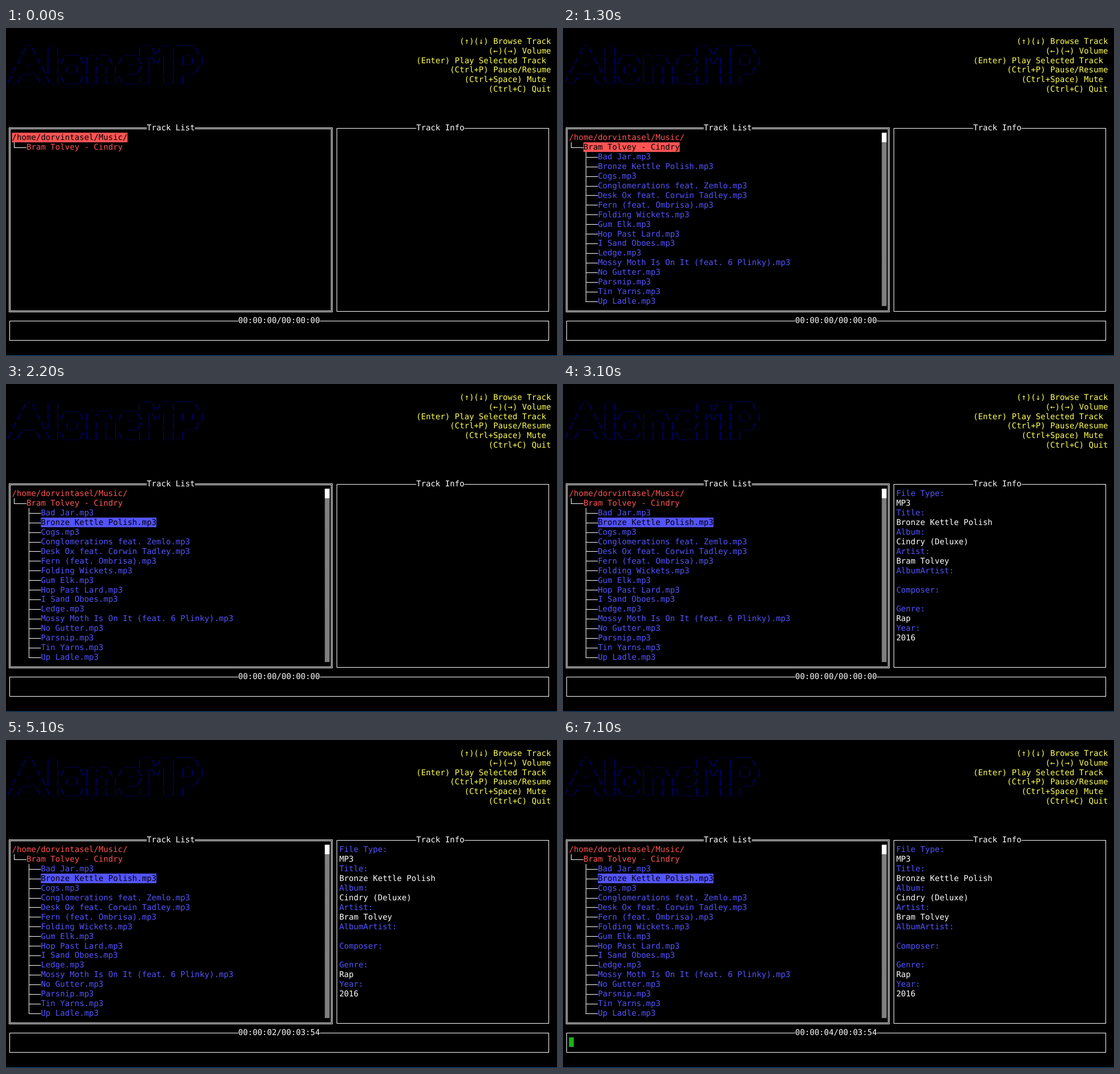
Animation of 970 by 577 pixels, one loop 8000 ms. Source, as an HTML page with a canvas:

```html
<!DOCTYPE html>
<html lang="en">
<head>
<meta charset="utf-8">
<title>Terminal music player</title>
<style>
html, body { margin: 0; width: 100%; height: 100%; overflow: hidden; background: #000; }
canvas { display: block; }
</style>
</head>
<body>
<canvas id="stage" width="970" height="577"></canvas>
<script>
const ctx = document.getElementById('stage').getContext('2d');
const LOOP = 8000;

// Terminal grid: 9 x 18 px cells, shown slightly reduced
const SCALE = 0.9413;
const CELL_W = 9 * SCALE, CELL_H = 18 * SCALE, LEFT = 2.1, TOP = -2.2, BASELINE = 12.9;
const WHITE = '#fff', RED = '#ff5454', BLUE = '#5454ff', YELLOW = '#ffff54',
      GREEN = '#18b218', NAVY = '#00009c';

const BANNER = [
  '    _    _                  __  __ ____',
  '   / \\  | | ___  _ __   ___|  \\/  |  _ \\',
  "  / _ \\ | |/ _ \\| '_ \\ / _ \\ |\\/| | |_) |",
  ' / ___ \\| | (_) | | | |  __/ |  | |  __/',
  '/_/   \\_\\_|\\___/|_| |_|\\___|_|  |_|_|'
];
const HELP = [
  '(↑)(↓) Browse Track',
  '(←)(→) Volume',
  '(Enter) Play Selected Track ',
  '(Ctrl+P) Pause/Resume',
  '(Ctrl+Space) Mute ',
  '(Ctrl+C) Quit'
];
const ROOT = '/home/dorvintasel/Music/';
const FOLDER = 'Bram Tolvey - Cindry';
const TRACKS = [
  'Bad Jar', 'Bronze Kettle Polish', 'Cogs', 'Conglomerations feat. Zemlo',
  'Desk Ox feat. Corwin Tadley', 'Fern (feat. Ombrisa)', 'Folding Wickets',
  'Gum Elk', 'Hop Past Lard', 'I Sand Oboes', 'Ledge',
  'Mossy Moth Is On It (feat. 6 Plinky)', 'No Gutter', 'Parsnip',
  'Tin Yarns', 'Up Ladle'
];
const INFO = [
  ['File Type:', 'MP3'], ['Title:', 'Bronze Kettle Polish'],
  ['Album:', 'Cindry (Deluxe)'], ['Artist:', 'Bram Tolvey'],
  ['AlbumArtist:', ''], ['Composer:', ''], ['Genre:', 'Rap'], ['Year:', '2016']
];

// Moments at which the selection moves down and the clock ticks
const MOVES = [700, 1900, 2200];
const TICKS = [4000, 5100, 6100, 7100];
const OPEN = 1300, PLAY = 3100, BAR = 6100;

const colX = c => LEFT + c * CELL_W;
const rowY = r => TOP + r * CELL_H;
// Rules fall on whole pixels; a row's rule sits just below its middle
const midX = c => Math.floor(colX(c + 0.5));
const midY = r => Math.floor(rowY(r + 0.54));
const passed = (times, t) => times.filter(at => t >= at).length;

function rect(x, y, w, h, color = WHITE) {
  ctx.fillStyle = color;
  ctx.fillRect(x, y, w, h);
}

function cells(col, row, cols, rows, color) {
  rect(colX(col), rowY(row), cols * CELL_W, rows * CELL_H, color);
}

function text(str, col, row, color = WHITE) {
  ctx.fillStyle = color;
  const y = rowY(row) + BASELINE;
  [...str].forEach((ch, i) => {
    if (ch !== ' ') ctx.fillText(ch, colX(col + i), y);
  });
}

function item(str, col, row, color, selected) {
  if (selected) cells(col, row, str.length, 1, color);
  text(str, col, row, selected ? '#000' : color);
}

function frame(x1, y1, x2, y2) {
  ctx.strokeStyle = WHITE;
  ctx.lineWidth = 1;
  ctx.strokeRect(x1 + 0.5, y1 + 0.5, x2 - x1, y2 - y1);
}

function panel(c1, r1, c2, r2, title, titleCol, double) {
  const box = [midX(c1), midY(r1), midX(c2), midY(r2)];
  if (double) {
    const [x1, y1, x2, y2] = box;
    frame(x1 - 1, y1 - 1, x2 + 1, y2 + 1);
    frame(x1 + 1, y1 + 1, x2 - 1, y2 - 1);
  } else {
    frame(...box);
  }
  cells(titleCol, r1, title.length, 1, '#000');
  text(title, titleCol, r1);
}

function branch(col, row, last) {
  const x = midX(col), y = midY(row), top = Math.round(rowY(row));
  rect(x, top, 1, (last ? y + 1 : Math.round(rowY(row + 1))) - top);
  rect(x, y, colX(col + 3) - x, 1);
}

function makeShade() {
  const tile = document.createElement('canvas');
  tile.width = tile.height = 2;
  const g = tile.getContext('2d');
  g.fillStyle = '#000';
  g.fillRect(0, 0, 2, 2);
  g.fillStyle = WHITE;
  g.fillRect(0, 0, 1, 1);
  g.fillRect(1, 1, 1, 1);
  const pattern = ctx.createPattern(tile, 'repeat');
  pattern.setTransform(new DOMMatrix([SCALE, 0, 0, SCALE, LEFT, TOP]));
  return pattern;
}
const shade = makeShade();

function drawTree(t) {
  const selected = passed(MOVES, t);
  item(ROOT, 1, 11, RED, selected === 0);
  branch(1, 12, true);
  item(FOLDER, 4, 12, RED, selected === 1);
  if (t < OPEN) return;
  TRACKS.forEach((name, i) => {
    branch(4, 13 + i, i === TRACKS.length - 1);
    item(name + '.mp3', 7, 13 + i, BLUE, selected === i + 2);
  });
  cells(66, 11, 1, 1, WHITE);
  cells(66, 12, 1, 17, shade);
}

function drawInfo() {
  INFO.forEach(([label, value], i) => {
    text(label, 69, 11 + 2 * i, BLUE);
    text(value, 69, 12 + 2 * i);
  });
}

function draw(t) {
  rect(0, 0, 970, 577, '#000');
  rect(0, 576, 970, 1, '#1d5c99');
  ctx.font = '14.08px "DejaVu Sans Mono", monospace';
  ctx.textBaseline = 'alphabetic';
  ctx.textRendering = 'geometricPrecision';

  BANNER.forEach((line, i) => text(line, 0, 1 + i, NAVY));
  HELP.forEach((line, i) => text(line, 113 - line.length, 1 + i, YELLOW));

  const sec = passed(TICKS, t);
  const clock = `00:00:0${sec}/00:${sec ? '03:54' : '00:00'}`;
  panel(0, 10, 67, 29, 'Track List', 29, true);
  panel(68, 10, 112, 29, 'Track Info', 85);
  panel(0, 30, 112, 32, clock, 48);

  drawTree(t);
  if (t >= PLAY) drawInfo();
  if (t >= BAR) cells(1, 31, 1, 1, GREEN);
}

const start = performance.now();
function tick() {
  draw((performance.now() - start) % LOOP);
  requestAnimationFrame(tick);
}
tick();
</script>
</body>
</html>
```
